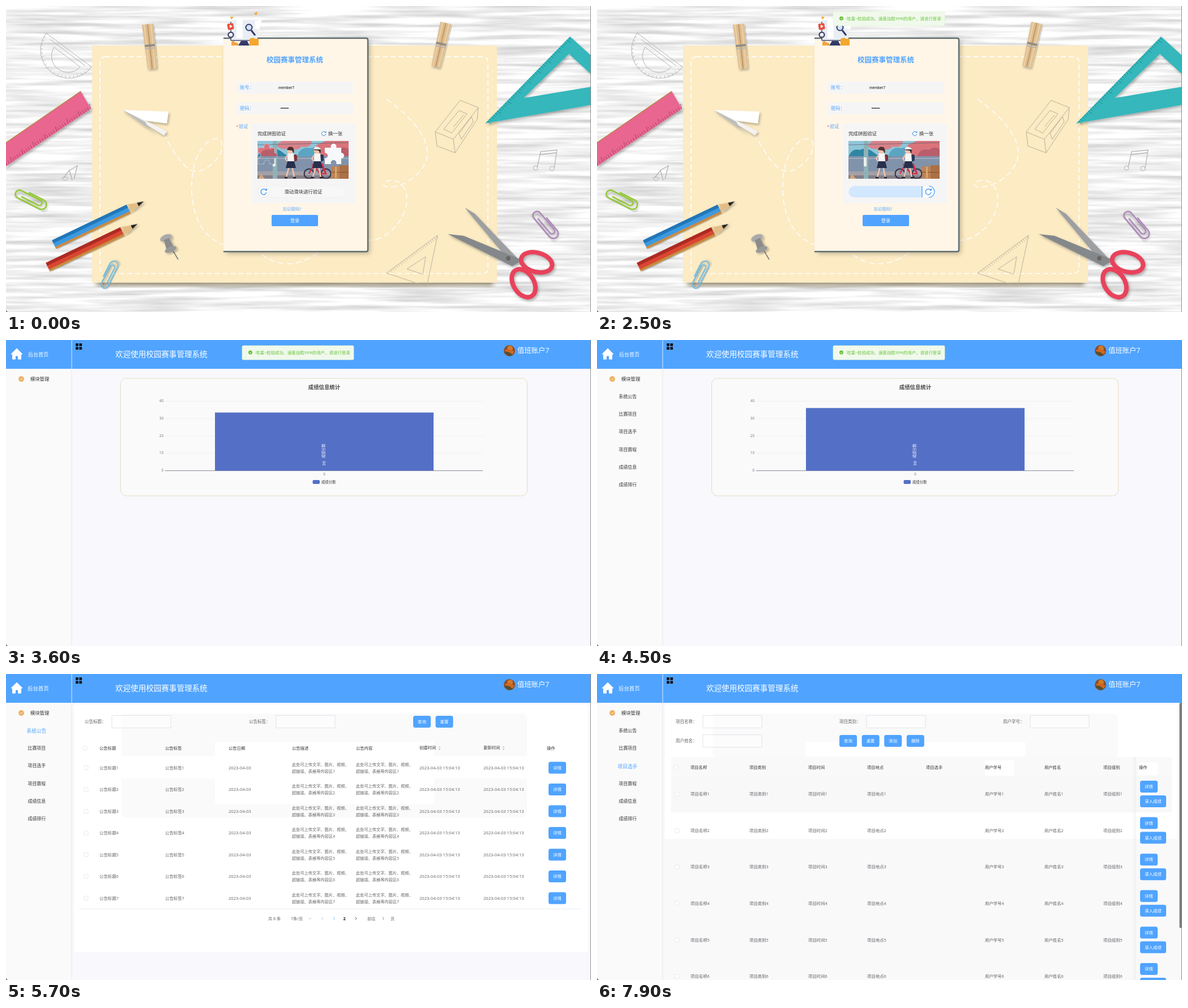
An HTML page that plays this animation: 1033x542 px, repeating every 8 s.

```html
<!DOCTYPE html>
<html lang="zh-CN">
<head>
<meta charset="utf-8">
<title>校园赛事管理系统</title>
<style>
html, body { margin: 0; width: 100%; height: 100%; overflow: hidden; background: #fff; }
svg { display: block; width: 1033px; height: 542px; font-family: "Open Sans", "Noto Sans CJK SC", "Noto Sans CJK", sans-serif; }
</style>
</head>
<body>
<svg id="stage" viewBox="0 0 1033 542" xmlns="http://www.w3.org/2000/svg"></svg>
<script>
const BLUE = '#50a4ff', INK = '#303133', GREY = '#606266', BAR = '#5470c6';
const LOOP = 8000;

// Markup helpers: text takes the vertical centre of its line.
const text = (x, y, s, size = 7.4, fill = GREY, more = '') =>
  `<text x="${x}" y="${(y + size * .36).toFixed(2)}" font-size="${size}" fill="${fill}" ${more}>${s}</text>`;
const mid = 'text-anchor="middle"';
const rect = (x, y, w, h, fill, more = '') => `<rect x="${x}" y="${y}" width="${w}" height="${h}" fill="${fill}" ${more}/>`;
const path = (d, fill, more = '') => `<path d="${d}" fill="${fill}" ${more}/>`;
const line = (d, stroke, width = 1, more = '') => path(d, 'none', `stroke="${stroke}" stroke-width="${width}" ${more}`);
const circle = (x, y, r, fill, more = '') => `<circle cx="${x}" cy="${y}" r="${r}" fill="${fill}" ${more}/>`;
const group = (attrs, ...parts) => `<g ${attrs}>${parts.join('')}</g>`;
const repeat = (n, f) => Array.from({ length: n }, (_, i) => f(i)).join('');

const defs = `<defs>
  <filter id="wood" x="0" y="0" width="1" height="1" color-interpolation-filters="sRGB">
    <feTurbulence type="fractalNoise" baseFrequency=".006 .13" numOctaves="3" seed="4"/>
    <feColorMatrix values=".36 0 0 0 .765 .36 0 0 0 .765 .36 0 0 0 .765 0 0 0 0 1"/>
  </filter>
  <filter id="soft"><feGaussianBlur stdDeviation="4"/></filter>
  <filter id="drop"><feDropShadow dx="2" dy="3" stdDeviation="2" flood-opacity=".28"/></filter>
  <clipPath id="photo"><rect x="444" y="239" width="161" height="67"/></clipPath>
  <clipPath id="pieceShape"><path id="piece" d="M563 251H574A5 5 0 1 1 583 251H592V260A5 5 0 1 1 592 270V280H583A5 5 0 1 0 574 280H563V270A5 5 0 1 0 563 260Z"/></clipPath>
  <clipPath id="fixedEdge"><rect width="951" height="542"/></clipPath>
  <clipPath id="menuClip"><rect id="menuBox" x="0" y="90" width="116" height="0"/></clipPath>
</defs>`;

function paperclip(x, y, angle, scale, color) {
  return group(`transform="translate(${x} ${y}) rotate(${angle}) scale(${scale})" filter="url(#drop)"`,
    line('M-17 4H17A5 5 0 0 0 17-6H-23A7.500 7.500 0 0 0-23 9H22A9 9 0 0 0 22-9H-8', color, 2.6, 'stroke-linecap="round"'));
}

function pencil(x, y, light, dark) {
  return group(`transform="translate(${x} ${y}) rotate(-25.600)" filter="url(#drop)"`,
    rect(0, -9, 146, 6, dark), rect(0, -3, 146, 7, light), rect(0, 4, 146, 4, '#c78a3c'),
    path('M146-9L174-1L146 8L150 4L146-1L150-4Z', '#e2bd85'), path('M164-4L176-1L164 3Z', '#222'));
}

function peg(x, y, angle) {
  return group(`transform="translate(${x} ${y}) rotate(${angle})" filter="url(#drop)"`,
    path('M-10-39H10L8 40H-8Z', '#dfbd8f'), line('M0-39V40', '#b38d59', 1.5), line('M-6-39L-5 40M6-39L5 40', '#ecd3ab', 2),
    rect(-9, -3, 18, 4, '#8d8d88'), rect(-9, 3, 18, 2, '#b5b3ac'));
}

function desk() {
  const sketch = '#b4b4b4', trail = 'stroke-dasharray="10 6" opacity=".8"';
  return [
    rect(0, 0, 1033, 542, '#f1f1f1', 'filter="url(#wood)"'),
    rect(160, 474, 700, 22, '#77694a', 'filter="url(#soft)" opacity=".7"'),
    rect(152, 70, 715, 420, '#fcebc3'),
    rect(166, 90, 685, 384, 'none', 'rx="9" stroke="#fff" stroke-width="2" stroke-dasharray="9 5" opacity=".85"'),
    line('M278 226C302 270 322 304 350 289C387 270 392 226 363 237C328 254 320 324 335 369C348 413 385 426 410 431', '#fff', 2, trail),
    line('M452 440C480 463 515 462 550 438M672 165C724 202 762 250 735 287C714 320 665 328 667 315C675 302 709 307 708 345C705 382 671 415 641 415', '#fff', 2, trail),
    peg(254, 71, -6), peg(768, 68, 13),
    // protractor, eraser, music notes and set square drawn in pencil
    line('M71 48A50 50 0 0 0 151 108ZM85 73A29 29 0 0 0 131 108ZM78 59L140 106', sketch),
    group('transform="translate(111 78) rotate(37)"', line(repeat(22, i => { const a = Math.PI * i / 21; return `M${50 * Math.cos(a)} ${50 * Math.sin(a)}L${46 * Math.cos(a)} ${46 * Math.sin(a)}`; }), sketch, .8)),
    line('M758 223L802 167L834 180L832 201L793 260L761 248ZM758 223L790 236L834 180M790 236L793 260M773 218L800 185L814 191L787 225ZM790 214L808 193M800 226L822 196L825 205L804 236Z', '#b9b09c'),
    line('M101 305L112 291L126 283L120 307M112 291L117 309M938 286L944 258L973 255L968 287M943 263L972 260', sketch, 1.3),
    `<ellipse cx="104" cy="306" rx="5" ry="3" fill="none" stroke="${sketch}"/>`,
    circle(935, 287, 4, 'none', `stroke="${sketch}"`), circle(964, 288, 4, 'none', `stroke="${sketch}"`),
    line('M762 406L672 473L743 497ZM741 444L708 466L736 475Z', '#bcb39e'),
    line(repeat(24, i => `M${760 - 3.500 * i} ${408 + 2.600 * i}l2 4`), '#bcb39e', .8),
    // ruler and teal set square
    group('filter="url(#drop)"', path('M0 242L132 151L150 182L0 284Z', '#e8668f'), line('M0 242L132 151', '#b8863f', 1.5), line(repeat(38, i => `M${150 - i * 4} ${182 + i * 2.700}l-3 ${i % 5 ? -5 : -9}`), '#9b3559', .8)),
    group('filter="url(#drop)"', path('M846 208L996 54L1040 94V174ZM914 163L1040 142V127L994 85Z', '#36b7bb', 'fill-rule="evenodd"'), line(repeat(42, i => `M${850 + i * 3.500} ${204 - i * 3.600}l${i % 5 ? '4 3' : '7 5'}`), '#197b80', .8)),
    // paper plane
    group('filter="url(#drop)"', path('M206 184L287 187L284 208L246 203Z', '#fff'), path('M206 184L246 203L284 222L279 229Z', '#f3f3f3'), path('M206 184L246 205L251 215L268 229Z', '#bdbdbd')),
    pencil(85, 423, '#3a9ae0', '#2276b8'), pencil(74, 463, '#d94632', '#ad2a22'),
    paperclip(44, 342, 27, .96, '#8fc62e'), paperclip(953, 387, 50, .96, '#a985b4'), paperclip(182, 476, -63, .84, '#72b9dc'),
    // drawing pin
    line('M294 432L304 449', '#777', 1.5),
    group('transform="translate(287 422) rotate(-22)" filter="url(#drop)"', `<ellipse cx="0" cy="-12" rx="11" ry="6" fill="#aaa"/>`, path('M-5-10H5L7 9H-7Z', '#8b8b8b'), `<ellipse cx="0" cy="10" rx="11" ry="5" fill="#999"/>`),
    // scissors
    group('filter="url(#drop)"',
      path('M810 357L828 368L908 452L894 458Z', '#9d9fa1'), path('M780 404L808 407L912 450L894 461Z', '#85888b'),
      `<ellipse cx="937" cy="454" rx="28" ry="17" transform="rotate(15 937 454)" fill="none" stroke="#e8435b" stroke-width="8"/>`,
      `<ellipse cx="914" cy="491" rx="27" ry="18" transform="rotate(58 914 491)" fill="none" stroke="#e8435b" stroke-width="8"/>`,
      circle(887, 447, 4, '#666'))
  ].join('');
}

function person(x, hair, bag) {
  return group(`transform="translate(${x} 0)"`,
    line('M-2 45L-7 64M3 45L7 64', '#efc4ad', 2.6), line('M-10 65H-5M5 65H10', '#222', 2.5),
    rect(5, 24, 7, 12, bag, 'rx="3"'), path('M-5 22H6L7 37H-5Z', '#f6f6f4'), path('M-5 36H7L10 48H-8Z', '#27304c'),
    line('M-4 24L-9 31L-6 36', '#efc4ad', 2.2), circle(0, 17, 5.5, '#efc4ad'), path('M-6 16Q-4 8 4 11Q8 15 6 22L3 17Z', hair));
}

function street() {
  const wheel = x => circle(x, 58, 8.5, 'none', 'stroke="#343044" stroke-width="2"');
  return group('transform="translate(444 239)"',
    rect(0, 0, 161, 67, '#8fc5d8'),
    path('M0 28Q6 12 20 16Q32 10 44 20L55 28Z', '#2f86a4'), path('M70 28Q75 9 93 13Q109 7 116 28Z', '#5aa5c1'),
    path('M34 9Q42-6 66 0H96Q95 13 78 10Q70 19 57 12Q45 18 34 9Z', '#d7828a'),
    path('M104 22Q96 7 115 3Q120-3 161 0V27H112Z', '#d9747b'), path('M122 27Q126 12 142 16Q153 8 161 15V27Z', '#b95e6b'),
    rect(0, 27, 161, 28, '#8193aa'), line('M0 31H161', '#a7b5c4', 1.5), rect(0, 54, 161, 13, '#a3a0a7'), rect(0, 61, 161, 6, '#837f89'),
    rect(27, 0, 8, 67, '#8eb2b5'), rect(27, 29, 5, 16, '#eceeed'), line('M0 7L161 3', '#57606e', .7), path('M2 67L6 58L13 67Z', '#d2a677'),
    wheel(91), wheel(121), line('M91 58L99 44L111 58L121 58L113 44L99 47M114 40L121 58M96 42H103', '#d42d48', 2.4),
    person(58, '#522f2e', '#7c3338'), person(105, '#2d2930', '#28385a'), path('M99 15Q102 7 110 12L112 15Z', '#f3f2ef'),
    rect(130, 45, 17, 22, '#bd8354'), rect(145, 43, 16, 24, '#ab7046'), rect(130, 55, 31, 1, '#805334'), rect(137, 46, 3, 20, '#d8a876'));
}

function refresh(x, y, r) {
  return group(`transform="translate(${x} ${y}) scale(${r / 5})"`, line('M4.600-2A5 5 0 1 0 5 1', '#2f8cf0', 1.3), path('M2-2.500H6V-6Z', '#2f8cf0'));
}

function loginCard() {
  return [
    rect(390, 62, 252, 376, '#5b5444', 'filter="url(#soft)" opacity=".45"'),
    path('M384 57H636Q639 57 639 60V432Q639 435 636 435H384Z', '#fff6e8'),
    line('M384 57H636Q639 57 639 60V432Q639 435 636 435H384', '#5f6c70', 2.4),
    // monitor ornament
    rect(398, 25, 46, 36, '#e9eef5', 'rx="2"'), rect(407, 25, 11, 32, '#fff'), path('M440 26L452 24L447 42L438 40Z', '#fff'),
    line('M397 61V28M397 61H445', '#454b73', 1.5), path('M415 62H426L430 70H410Z', '#343a68'),
    rect(391, 31, 11, 11, '#e8503d', 'rx="2" transform="rotate(-10 396 36)"'), path('M395 33L400 36L395 39Z', '#fff'),
    circle(397, 51, 4.5, '#fff', 'stroke="#454b73" stroke-width="2.500"'), circle(429, 38, 5.5, '#d3e5f7', 'stroke="#343a68" stroke-width="2"'), line('M433 43L440 52', '#343a68', 3),
    path('M430 58L437 56L439 58H446V70H430Z', '#f5a72d'), path('M398 70V64Q402 59 404 64L410 66V70Z', '#f2a440'),
    path('M438 13L444 10L442 17Z', '#f5a72d'), path('M396 19H402L398 24Z', '#f5a72d'),
    text(510, 95, '校园赛事管理系统', 12.5, BLUE, mid + ' font-weight="700"'),
    rect(407, 134, 206, 21, '#f5f5f5'), rect(407, 171, 206, 21, '#f5f5f5'),
    text(413, 144.500, '账号：', 8.3, BLUE), text(413, 181, '密码：', 8.3, BLUE),
    text(481, 145, 'member7', 6.7, '#111', 'font-family="Liberation Sans, sans-serif"'),
    repeat(6, i => circle(486 + i * 2.400, 181, .95, '#111')),
    text(406, 213, '*', 8, '#f56c6c'), text(411, 213, '验证', 8.3, BLUE),
    rect(434, 208, 184, 141, '#f5f5f5', 'rx="2"'),
    text(444, 226, '完成拼图验证', 8.4, INK), refresh(561, 226, 3.7), text(569, 226, '换一张', 8.4, INK),
    group('clip-path="url(#photo)"', street(),
      '<g id="puzzle"><use href="#piece" fill="#f7f8fa"/><g id="movingPiece"><g clip-path="url(#pieceShape)">' + street() +
      '</g><use href="#piece" fill="none" stroke="#fff" stroke-width=".6" opacity=".6"/></g></g>'),
    rect(444.500, 319, 157, 20, '#f7f7f7', 'rx="10" stroke="#eee" stroke-width=".7"'),
    text(525, 329, '滑动滑块进行验证', 8.4, INK, mid + ' id="hint"'),
    path('', '#d1e8ff', 'id="fill"'),
    group('id="knob"', path('M0 319H12A10 10 0 0 1 12 339H0Z', '#fff', 'id="knobFace"'),
      line('M0 319V339M12 319A10 10 0 0 1 12 339', '#3c98f5', 1.2, 'id="knobEdge"'),
      circle(11, 329, 10, '#fafafa', 'id="knobRest" stroke="#eaeaea" stroke-width=".7"'), refresh(11, 329, 5)),
    text(505, 359, '忘记密码?', 7.4, BLUE, mid),
    rect(469, 370, 82, 20, BLUE, 'rx="2"'), text(510, 380, '登录', 8, '#fff', mid + ' font-weight="500"')
  ].join('');
}

const menuItems = ['系统公告', '比赛项目', '项目选手', '项目赛程', '成绩信息', '成绩排行'];

function adminFrame() {
  const gear = repeat(8, i => rect(25.500, 64.300, 3, 9.400, '#edb165', `transform="rotate(${i * 45} 27 69)"`));
  return [
    rect(0, 0, 1033, 542, '#f8f8fd'), rect(0, 51, 116, 491, '#fafafa'), line('M116 51V542', '#e8e8ea'),
    rect(0, 0, 1033, 51, BLUE), line('M116 0V51', '#d8ebff'),
    path('M19 15L29 25H26.500V34H21.500V28H16.500V34H11.500V25H9Z', '#fff', 'stroke="#fff" stroke-linejoin="round"'),
    text(39, 25.500, '后台首页', 9, '#fff', 'id="home"'),
    repeat(4, i => rect(123 + i % 2 * 6.300, 6 + (i >> 1) * 6.300, 4.800, 4.800, '#111')),
    text(193, 25.500, '欢迎使用校园赛事管理系统', 13.55, '#fff'),
    circle(889, 19, 10, '#884d2a'), circle(890, 15, 5, '#d07a2d'), path('M881 18Q889 14 898 21L893 27H883Z', '#d3661f'), path('M880 21Q888 19 895 27Q885 31 880 21Z', '#525032'),
    text(903, 18.500, '值班账户7', 12.3, '#fff'),
    circle(27, 69, 3.8, '#edb165'), gear, line('M25 69L26.500 70.500L29.500 67.500', '#fff', .8),
    text(43, 69, '模块管理', 8.3, INK),
    group('clip-path="url(#menuClip)"', menuItems.map((s, i) => text(38.500, 100 + i * 31.200, s, 7.9, INK, 'class="menu"')).join(''))
  ].join('');
}

function chart() {
  const ticks = repeat(5, i => text(278, 231 - i * 30.800, i * 10, 6.3, '#6e7079', 'text-anchor="end"') + line(`M281 ${231.500 - i * 30.800}H842`, i ? '#ececf0' : '#8b8e98', i ? .8 : 1));
  return [
    rect(202.500, 68, 718, 208, '#fafafa', 'rx="10" stroke="#e6dcbd"'),
    group('id="chartEmpty"', text(561.500, 83, '条形图', 8.4, '#333', mid), line('M549 87.500H574', '#7d4a4a', .8),
      rect(407, 135, 206, 20, '#f6f6f6'), rect(407, 171, 206, 21, '#f6f6f6'), rect(434, 208, 184, 68, '#f6f6f6'), rect(444, 239, 161, 37, '#fafafa')),
    group('id="chartFull"', text(562, 83.500, '成绩信息统计', 9.4, '#464646', mid + ' font-weight="700"'), ticks,
      rect(369, 120.500, 386, 111, BAR, 'id="bar"'),
      group('id="barLabel" transform="translate(561 223) rotate(-90)"', text(0, 0, '36', 7.8, '#fff'), text(14, 0, '成绩分数', 6.3, '#fff')),
      text(562, 238, '0', 6.3, '#6e7079', mid), rect(541.500, 248, 12.500, 7, BAR, 'rx="2"'), text(557, 251.500, '成绩分数', 6.3, '#333'))
  ].join('');
}

const field = (x, y, label, inputX, width = 104) =>
  text(x, y, label + '：', 7.5) + rect(inputX, y - 11, width, 22, '#fff', 'fill-opacity=".3" stroke="#e1e4ec"');
const button = (x, y, label, width = 31) =>
  rect(x, y - 10.500, width, 21, BLUE, 'rx="3.500"') + text(x + width / 2, y, label, 7.4, '#fff', mid + ' font-weight="500"');
const checkbox = (x, y) => rect(x, y - 3.500, 7, 7, '#fff', 'rx="1" stroke="#e2e4ea" stroke-width=".8"');
const carets = (x, y) => path(`M${x} ${y - 1}h4l-2-2.500ZM${x} ${y + 1}h4l-2 2.500Z`, '#c0c4cc');
const chevron = (x, y) => line(`M${x - 2.500} ${y - 1}l2.500 2.500l2.500-2.500`, '#b4b8c0', .8);

const header = (xs, names, y) => checkbox(136, y) + names.map((s, i) => {
  const sorted = s.endsWith('时间') && /创建|更新/.test(s);
  return text(xs[i], y - (sorted ? 1 : 0), s, 7.3, INK, 'font-weight="500"') + (sorted ? carets(xs[i] + 33.500, y) : '');
}).join('');

// Pale areas remaining behind the tables.
const haze = rect(204, 70, 716, 184, '#fafafa', 'rx="8"') + rect(369, 120, 387, 111, '#fff') + rect(200, 146, 724, 39, '#fff');
const STAMP = '2023-04-03 15:04:13';

function noticePage() {
  const xs = [165, 281, 393, 505, 618, 730, 843, 955];
  const rows = repeat(7, i => {
    const y = 166 + i * 38.500, n = i + 1;
    const body = x => text(x, y - 6, '此处可上传文字、图片、视频、', 7.2) + text(x, y + 6, '超链接、表格等内容区' + n, 7.2);
    return checkbox(138, y) + text(165, y, '公告标题' + n) + text(281, y, '公告标签' + n) + text(393, y, '2023-04-03', 7.6) +
      body(505) + body(618) + text(730, y, STAMP, 7.6) + text(843, y, STAMP, 7.6) + button(958, y, '详情');
  });
  const pager = [[463, '共 8 条'], [503, '7条/页'], [638, '前往'], [664, '1'], [679, '页']].map(([x, s]) => text(x, 433, s, 7.2)).join('') +
    text(577, 433, '1', 7.2, BLUE) + text(595.500, 433, '2', 7.2, '#111', 'font-weight="700"') + chevron(537, 433) +
    line('M560 430.500l-2.500 2.500l2.500 2.500', '#bbb', .8) + line('M616.500 430.500l2.500 2.500l-2.500 2.500', '#333', .8);
  return rect(120, 54, 908, 439, '#fff', 'id="noticePanel"') + haze + rect(131, 146, 884, 39, '#f7f8fa', 'id="hover1"') +
    field(139, 84.500, '公告标题', 187) + field(429, 84.500, '公告标签', 477) + button(719, 84.500, '查询') + button(758.500, 84.500, '重置') +
    header(xs, ['公告标题', '公告标签', '公告日期', '公告描述', '公告内容', '创建时间', '更新时间', '操作'], 131.500) +
    group('id="rows1"', rows, line('M130 416H1016', '#e9ecf2'), pager);
}

const wideX = [165, 269, 373, 477, 581, 685, 790, 894];
const fixedColumn = (y, height) => rect(946, y, 5, height, '#000', 'opacity=".02"') + line(`M951 ${y}V542`, '#eeeeef');
const scrollbar = end => rect(1028.500, 51, 4, end - 51, '#7b7b7b', 'rx="2"');

function tile(y) {
  const c = '#e2786b', sq = (x, y) => rect(x, y, 19, 19, c, 'rx="4"');
  return sq(688, y - 24) + sq(688, y - 2) + sq(709.500, y - 2) + rect(711, y - 22.500, 16, 16, c, `rx="3" transform="rotate(45 719 ${y - 14.500})"`);
}

function projectPage() {
  const late = ['2024-07-13 21:52:36', '2024-07-13 22:04:18'];
  const rows = repeat(6, i => {
    const y = 180.500 + i * 67.850;
    return checkbox(138, y) + ['名称', '类别', '时间', '地点', '描述'].map((s, k) => text(wideX[k], y, `项目${s}${i + 1}`)).join('') +
      (i > 1 ? tile(y) : '') + text(790, y, STAMP, 7.6) + text(894, y, late[i] || STAMP, 7.6, GREY, 'clip-path="url(#fixedEdge)"') +
      button(959, y - 13, '详情') + button(959, y + 13, '录入选手', 46);
  });
  return rect(120, 54, 904, 488, '#fff') + haze + rect(131, 146, 884, 68, '#f7f8fa', 'id="hover2"') +
    field(139, 84.500, '项目名称', 187) + field(428, 84.500, '项目类别', 476, 114) + text(483, 85, '请选择', 7.4, '#b4b8c0') + chevron(580, 85) +
    button(717, 84.500, '查询') + button(756, 84.500, '重置') +
    header([...wideX, 957], ['项目名称', '项目类别', '项目时间', '项目地点', '项目描述', '项目图片', '创建时间', '更新时间', '操作'], 131.500) +
    fixedColumn(118, 424) + group('id="rows2"', rows) + scrollbar(456);
}

function playerPage() {
  const rows = repeat(6, i => {
    const y = 212.500 + i * 64.600;
    const names = ['项目名称', '项目类别', '项目时间', '项目地点', '', '用户学号', '用户姓名', '项目组别'];
    return checkbox(138, y) + names.map((s, k) => s && text(wideX[k], y, s + (i + 1))).join('') +
      button(959, y - 13, '详情') + button(959, y + 13, '录入成绩', 46);
  });
  return rect(120, 54, 904, 488, '#f9f9fa') + rect(120, 54, 904, 238, '#fff') + rect(204, 70, 716, 77, '#fafafa', 'rx="8"') + rect(368, 120, 388, 26, '#fff') +
    rect(131, 147, 884, 34, '#f9f9f9') + rect(685, 153, 52, 27, '#fff') + rect(956, 157, 34, 22, '#fff') + rect(131, 181, 884, 64, '#f8f8f9', 'id="hover3"') +
    field(139, 84.500, '项目名称', 187) + field(428, 84.500, '项目类别', 476) + field(717, 84.500, '用户学号', 765) + field(139, 118.500, '用户姓名', 187) +
    ['查询', '重置', '添加', '删除'].map((s, i) => button(428 + i * 39.600, 118.500, s)).join('') +
    header([...wideX, 957], ['项目名称', '项目类别', '项目时间', '项目地点', '项目选手', '用户学号', '用户姓名', '项目组别', '操作'], 165.500) +
    fixedColumn(147, 395) + group('id="rows3"', rows) + scrollbar(450);
}

const toast = rect(417, 10, 197, 25, '#f0f9eb', 'rx="2" stroke="#e1f3d8" stroke-width=".7"') + circle(431.500, 22, 3.5, '#67c23a') +
  line('M430 22L431.200 23.300L433.300 21', '#fff', .8) + text(441, 22.500, '哇塞~检验成功，速度战胜99%的用户，请进行登录', 7.4, '#67c23a');

const stage = document.getElementById('stage');
stage.innerHTML = defs + group('id="login"', desk(), loginCard()) +
  group('id="admin"', adminFrame(), group('id="chart"', chart()), group('id="page1"', noticePage()), group('id="page2"', projectPage()), group('id="page3"', playerPage())) +
  group('id="toast"', toast) + line('M1032.500 0V542', '#8a8a8a') + path('M0 538Q1 541 4 542H0Z', '#777');

const el = {};
stage.querySelectorAll('[id]').forEach(node => el[node.id] = node);
const menu = [...stage.querySelectorAll('.menu')];
const show = (id, on) => el[id].setAttribute('display', on ? 'inline' : 'none');
const set = (node, attrs) => Object.entries(attrs).forEach(([k, v]) => node.setAttribute(k, v));
const progress = (t, from, to) => Math.min(1, Math.max(0, (t - from) / (to - from)));
const smooth = p => p * p * (3 - 2 * p);
const cubicOut = p => 1 - (1 - p) ** 3;

function drawSlider(t) {
  const d = 134 * smooth(progress(t, 650, 1300)) - 4 * progress(t, 1400, 1600);
  const dragging = d > 0, x = 444 + d;
  set(el.knob, { transform: `translate(${x} 0)` });
  set(el.movingPiece, { transform: `translate(${(d / 130 - 1) * 118} 0)` });
  const r = Math.min(10, d);
  set(el.fill, { d: `M${x} 319H${444.500 + r}A${r} 10 0 0 0 ${444.500 + r} 339H${x}Z` });
  show('fill', dragging);
  show('hint', !dragging);
  show('knobRest', !dragging);
  show('knobFace', dragging);
  show('knobEdge', dragging);
  show('puzzle', t < 2000);
}

function drawAdmin(t) {
  const page = t < 4800 ? 0 : t < 6400 ? 1 : t < 7500 ? 2 : 3;
  ['chart', 'page1', 'page2', 'page3'].forEach((id, i) => show(id, i === page));
  set(el.home, { x: page ? 38 : 39, 'font-size': page ? 9.4 : 9 });
  set(el.menuBox, { height: 180 * smooth(progress(t, 4220, 4500)) });
  menu.forEach((node, i) => {
    const active = i === page - 1;
    set(node, { x: active ? 36.500 : 38.500, y: 102.900 + i * 31.200 + (active ? 1.3 : 0), 'font-size': active ? 8.7 : 7.9, fill: active ? BLUE : INK });
  });
  show('chartEmpty', t < 3100);
  show('chartFull', t >= 3100);
  const grow = cubicOut(progress(t, 3040, 4000));
  set(el.bar, { y: 231.500 - 111 * grow, height: 111 * grow });
  set(el.barLabel, { opacity: progress(t, 3100, 3400) });
  set(el.noticePanel, { height: t < 5000 ? 223 : 439 });
  show('rows1', t >= 5000);
  show('rows2', t >= 6450);
  show('rows3', t >= 7600);
  show('hover1', t >= 5400 && t < 5700 || t >= 5900);
  show('hover2', t >= 7200);
  show('hover3', t >= 7900);
}

function render(t) {
  const admin = t >= 2900;
  show('login', !admin);
  show('admin', admin);
  if (admin) drawAdmin(t); else drawSlider(t);
  const visible = cubicOut(progress(t, 1960, 2450)) * (1 - progress(t, 4950, 5100));
  show('toast', visible > 0);
  set(el.toast, { opacity: visible, transform: `translate(0 ${-12 * (1 - visible)})` });
}

function tick(now) {
  render(now % LOOP);
  requestAnimationFrame(tick);
}
render(0);
requestAnimationFrame(tick);
</script>
</body>
</html>
```
